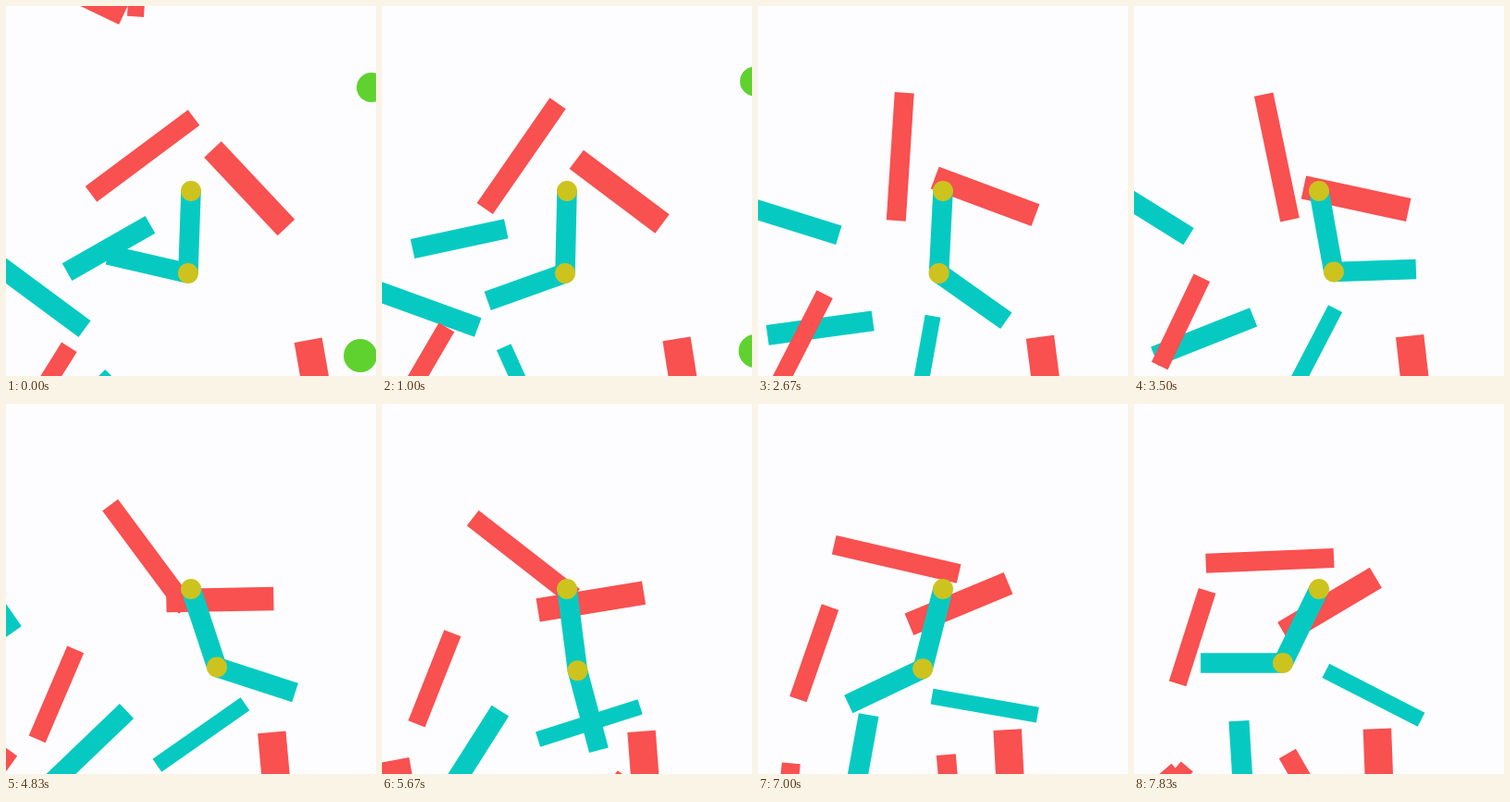
Write an HTML page with a canvas that moves like this. It is 400 px wide and 400 px high and loops after 8000 ms.

```html
<!DOCTYPE html>
<html lang="en">
<head>
<meta charset="utf-8">
<title>Drifting bars and a double pendulum</title>
<style>
  html, body { margin: 0; width: 100%; height: 100%; overflow: hidden; background: #fdfdff; }
  canvas { display: block; width: 100vw; height: 100vh; }
</style>
</head>
<body>
<canvas width="400" height="400"></canvas>
<script>
const LOOP = 8000, STEP = 1000 / 6;
const RED = '#f95050', TEAL = '#06cac2', GREEN = '#5fd230', YELLOW = '#cdc31e';
const ctx = document.querySelector('canvas').getContext('2d');

// x, y and angle are polynomials in seconds: [start, speed, half acceleration]
const bars = [
  { color: RED, size: [100, 22], x: [81.7, -4], y: [-11.5, -30], angle: [25.5, -5] },
  { color: RED, size: [60, 18], x: [142, 2], y: [-18.5, -30], angle: [94, 5] },
  { color: RED, size: [116, 25.5], x: [263.2, -6.6], y: [197.2, 3.6, -.13], angle: [46.8, -9.9] },
  { color: RED, size: [138.5, 21], x: [147.5, 3.6, -.47], y: [162, 0, .12], angle: [-36.7, -18.6] },
  { color: TEAL, size: [103.5, 21.5], x: [111, -27.4], y: [262, -10, -.42], angle: [-29.7, 17.6] },
  { color: TEAL, size: [115, 22], x: [38.8, 11, -.13], y: [315, 13.2, -.3], angle: [36.5, -16.6] },
  { color: TEAL, size: [116, 17], x: [142.2, 13.1, .23], y: [440, -18.8, .36], angle: [-135, 20.7] },
  { color: RED, size: [105.5, 19.5], x: [40.4, 2.9], y: [413.5, -20.6], angle: [-58, -1.83] },
  { color: RED, size: [100, 30.5], x: [335.3, -9], y: [410.5, -1.2], angle: [80, 1] },
  { color: RED, size: [110, 21], x: [332, -17.7], y: [504, -10], angle: [295, -30] },
  { color: RED, size: [60, 20], x: [-131.6, 23.5], y: [17.9, 108.5, -7.33], angle: [304, -55.5], from: 3.5 },
  { color: RED, size: [60, 17], x: [38], y: [545.5, -16.67], angle: [-50] }
];
const balls = [
  { r: 16, x: [395, 8], y: [88, -6.6] },
  { r: 18, x: [383, 20.5], y: [378, -5] }
];

const pivot = { x: 200, y: 200 }, ARM = 89;
const times = [0, 1, 2, 3.5, 4.833, 6.333, 7.833];
const upperAngle = spline(times, [92, 91.3, 99.7, 79.7, 71.7, 94.5, 116]);
const lowerAngle = spline(times, [193, 160.4, 81.3, -2, 18, 123.3, 180]);

const rad = deg => deg * Math.PI / 180;
const poly = ([a, b = 0, c = 0], t) => a + b * t + c * t * t;

// Cubic Hermite through the keys, with parabolic tangents.
function spline(ts, vs) {
  const last = ts.length - 1;
  const gap = i => ts[i + 1] - ts[i];
  const slope = i => (vs[i + 1] - vs[i]) / gap(i);
  const inner = i => (gap(i) * slope(i - 1) + gap(i - 1) * slope(i)) / (gap(i) + gap(i - 1));
  const tangent = vs.map((_, i) =>
    i === 0 ? 2 * slope(0) - inner(1) :
    i === last ? 2 * slope(last - 1) - inner(last - 1) : inner(i));
  return t => {
    let i = 0;
    while (i < last - 1 && t > ts[i + 1]) i++;
    const h = gap(i), u = Math.min(1, (t - ts[i]) / h), w = 1 - u;
    return vs[i] * w * w * (1 + 2 * u) + vs[i + 1] * u * u * (1 + 2 * w)
      + h * u * w * (tangent[i] * w - tangent[i + 1] * u);
  };
}

function drawBar(color, x, y, angle, length, width) {
  ctx.save();
  ctx.translate(x, y);
  ctx.rotate(rad(angle));
  ctx.fillStyle = color;
  ctx.fillRect(-length / 2, -width / 2, length, width);
  ctx.restore();
}

function drawDisc(color, x, y, r) {
  ctx.fillStyle = color;
  ctx.beginPath();
  ctx.arc(x, y, r, 0, 2 * Math.PI);
  ctx.fill();
}

function drawArm(start, angle) {
  const dx = ARM * Math.cos(rad(angle)), dy = ARM * Math.sin(rad(angle));
  drawBar(TEAL, start.x + dx / 2, start.y + dy / 2, angle, ARM, 21.5);
  return { x: start.x + dx, y: start.y + dy };
}

function draw(t) {
  ctx.fillStyle = '#fdfdff';
  ctx.fillRect(0, 0, 400, 400);
  for (const { color, size, x, y, angle, from = 0 } of bars) {
    if (t >= from) drawBar(color, poly(x, t), poly(y, t), poly(angle, t), ...size);
  }
  for (const { r, x, y } of balls) drawDisc(GREEN, poly(x, t), poly(y, t), r);
  const elbow = drawArm(pivot, upperAngle(t));
  drawArm(elbow, lowerAngle(t));
  for (const joint of [pivot, elbow]) drawDisc(YELLOW, joint.x, joint.y, 11);
}

function tick() {
  const ms = (performance.now() + 5) % LOOP;
  draw(Math.floor(ms / STEP) * STEP / 1000);
  requestAnimationFrame(tick);
}
tick();
</script>
</body>
</html>
```
